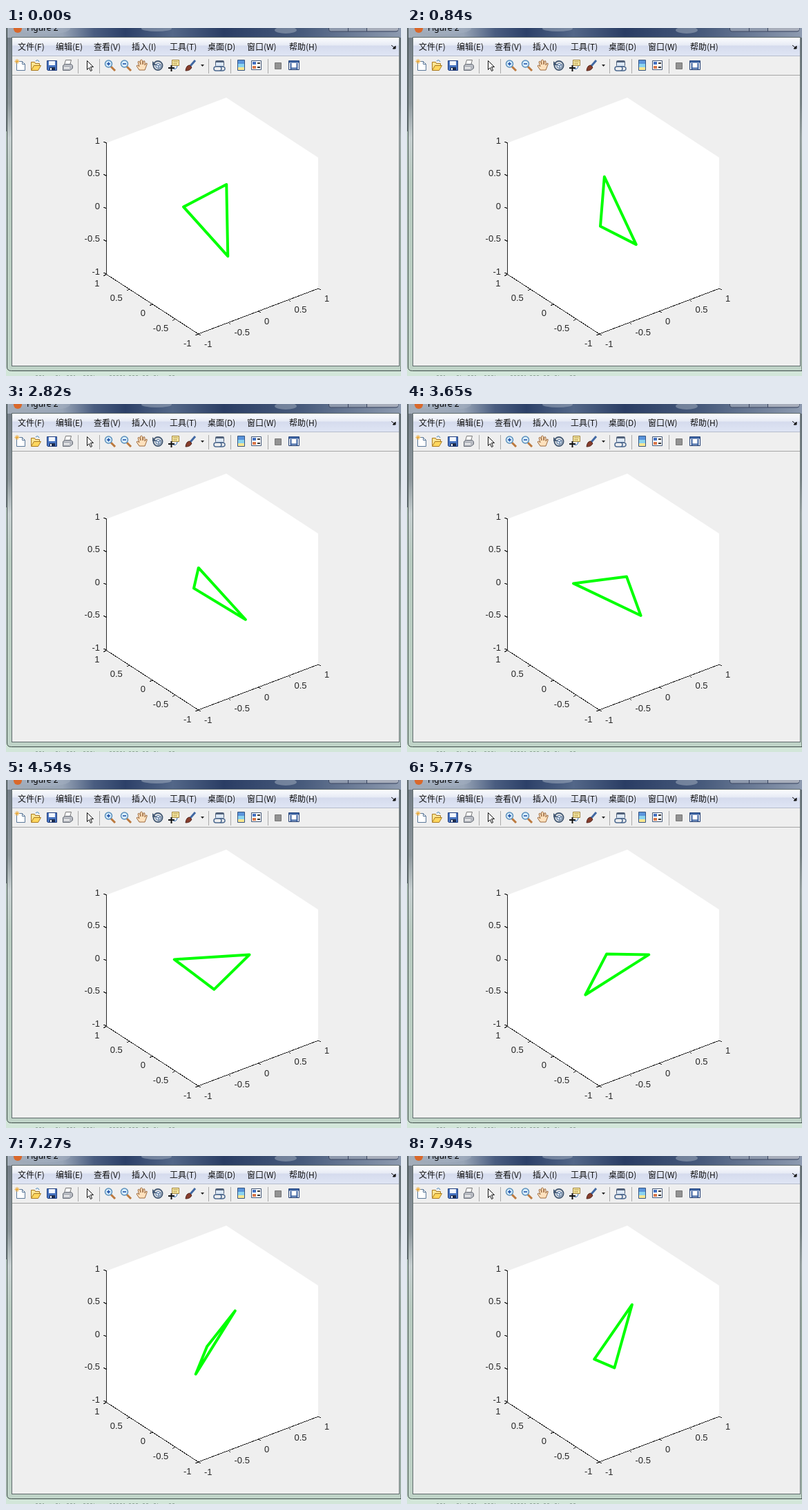
An HTML page that plays this animation: 572x505 px, repeating every 8 s.

```html
<!DOCTYPE html>
<html lang="zh">
<head>
<meta charset="utf-8">
<title>Figure</title>
<style>
html, body { margin: 0; width: 100%; height: 100%; overflow: hidden; background: #d2e6d9; }
svg { display: block; width: 572px; height: 505px; }
.menu { font: 12px "Noto Sans CJK SC", "Noto Sans CJK", sans-serif; fill: #111; }
.labels { font: 13px "Liberation Sans", Arial, sans-serif; fill: #262626; }
</style>
</head>
<body>
<svg viewBox="0 0 572 505">
  <defs>
    <linearGradient id="title">
      <stop offset="0" stop-color="#a3adb9"/><stop offset=".14" stop-color="#97a4b6"/>
      <stop offset=".22" stop-color="#4a5d80"/><stop offset=".3" stop-color="#2c4068"/>
      <stop offset=".42" stop-color="#536788"/><stop offset=".55" stop-color="#2a3d64"/>
      <stop offset=".75" stop-color="#485b7c"/><stop offset="1" stop-color="#8e9bb0"/>
    </linearGradient>
    <linearGradient id="menuBar" x2="0" y2="1">
      <stop offset="0" stop-color="#fbfcfe"/><stop offset=".42" stop-color="#e7ebf5"/>
      <stop offset=".46" stop-color="#d5dbed"/><stop offset="1" stop-color="#dfe5f4"/>
    </linearGradient>
    <linearGradient id="frame" x2="0" y2="1">
      <stop offset="0" stop-color="#707a84"/><stop offset=".22" stop-color="#8d979c"/>
      <stop offset=".32" stop-color="#c6cfd0"/><stop offset=".45" stop-color="#b7cabf"/>
      <stop offset="1" stop-color="#bfd3c7"/>
    </linearGradient>
  </defs>

  <!-- desktop behind and window frame -->
  <rect width="572" height="505" fill="#d2e6d9"/>
  <path d="M0 0h2v150h-2z" fill="#7b858c"/>
  <path d="M43 504.500h12M72 504.500h6M88 504.500h12M112 504.500h16M150 504.500h22M178 504.500h14M198 504.500h10M214 504.500h6M236 504.500h10" stroke="#8fa398" stroke-dasharray="3 2"/>
  <path d="M1.500 0V492q0 5.500 6 5.500H572V0z" fill="url(#frame)" stroke="#3f4c4a"/>
  <rect x="2" width="570" height="14" fill="url(#title)"/>
  <g fill="#a5b1c2" opacity=".5">
    <ellipse cx="55" cy="1" rx="38" ry="8"/><ellipse cx="218" cy="1" rx="22" ry="4"/><ellipse cx="405" cy="3" rx="16" ry="5"/>
  </g>
  <circle cx="17" cy="1" r="6" fill="#d9682b"/>
  <text x="30" y="4" style="font:12px 'Noto Sans',sans-serif">Figure 2</text>
  <path d="M467.500-1v3q0 3 3 3H565q3 0 3-3V-1M495.500 0v5M522.500 0v5" fill="#8f9aad" stroke="#3a4560"/>
  <path d="M523-1h45v3q0 2-3 2h-42z" fill="#a8aebb"/>
  <rect x="8.500" y="13.500" width="561" height="477" fill="#efefef" stroke="#5f6b6c"/>
  <rect x="9" y="14" width="560" height="26" fill="url(#menuBar)"/>
  <path d="M9 40.500h560" stroke="#b6bccc"/>
  <path d="M9 68.500h560" stroke="#a5a5a5"/>
  <path d="M558 25l5 4M564 26v4h-4z" stroke="#111" fill="#111"/>
  <g class="menu" id="menu"></g>

  <!-- toolbar -->
  <path d="M104.500 45v21M135.500 45v21M293.500 45v21M325.500 45v21M379.500 45v21" stroke="#aaa"/>
  <g stroke-linejoin="round">
    <path d="M15.500 48.500h8l4 4v9h-12z" fill="#fff" stroke="#5b7899"/>
    <path d="M23.500 48.500v4h4" fill="none" stroke="#5b7899"/>
    <path d="M16 45v7M12.500 48.500h7M13.500 46l5 5M18.500 46l-5 5" stroke="#eba52c"/>
    <path d="M36.500 60.500v-11h5l1 2h6v3" fill="#ffe592" stroke="#a87920"/>
    <path d="M36.500 61.500l4-7h10l-4 7z" fill="#ffd75e" stroke="#a87920"/>
    <path d="M43 48q3-3 5 1" fill="none" stroke="#377bb6"/>
    <path d="M59.500 47.500h14v14h-13l-1-1z" fill="#4773bf" stroke="#243f7e"/>
    <path d="M62 48h9v6h-9z" fill="#f2f6ff"/><path d="M63 57h8v4h-8z" fill="#1d2c4c"/><path d="M64 58h2v3h-2z" fill="#fff"/>
    <path d="M84.500 53.500l2-7h8l-2 7z" fill="#fff" stroke="#777"/>
    <path d="M82.500 54.500l3-2h9l2 2v4l-4 3h-10z" fill="#b7bac1" stroke="#666c75"/>
    <path d="M84 58h8" stroke="#eee" stroke-width="2"/>
    <path d="M117.500 47.500v13l3-3 2 5 2-1-2-5h4z" fill="#fff" stroke="#111"/>
    <g id="lens">
      <path d="M152 56l6 6" stroke="#bc793d" stroke-width="3"/>
      <circle cx="148.500" cy="52" r="5" fill="#daf0ff" stroke="#5a8fba" stroke-width="1.500"/>
      <path d="M146 52h5" stroke="#174aa1" stroke-width="1.500"/>
    </g>
    <path d="M148.500 49.500v5" stroke="#174aa1" stroke-width="1.500"/>
    <use href="#lens" x="23"/>
    <path d="M193 61l-4-6q1-2 3 0l1 1-2-7q2-2 3 1l1 3-.5-6q2-2 3 0l.5 6 1-5q2-1 2 1v5l2-3q2 0 1 2l-3 8z" fill="#ffe1bd" stroke="#9b693d"/>
    <circle cx="220" cy="54.500" r="6.500" fill="none" stroke="#465b75" stroke-width="2"/>
    <path d="M217 53l3-2 4 2v4l-3 2-4-2zM217 53l4 2v4M221 55l3-2" fill="#dfe9f5" stroke="#476890"/>
    <path d="M212 48v6h6z" fill="#465b75"/>
    <rect x="240.500" y="46.500" width="10" height="8" fill="#fff0aa" stroke="#a0833d"/>
    <path d="M242 49h7M242 52h6" stroke="#a0833d"/>
    <path d="M235 58h9M239.500 54v9" stroke="#111" stroke-width="2"/>
    <path d="M242 59q5 2 6-4" fill="none" stroke="#346db2"/>
    <path d="M267 55l7-8" stroke="#4168a2" stroke-width="3"/>
    <path d="M260 62q1-8 6-8l3 3q-2 5-9 5z" fill="#873d2c" stroke="#54271f"/>
    <path d="M282 53h5l-2.500 3z" fill="#222"/>
    <rect x="303.500" y="47.500" width="12" height="8" rx="1" fill="#dce8f6" stroke="#52627a"/>
    <path d="M304 49h11" stroke="#52627a" stroke-width="2"/>
    <path d="M304 56h5q3 0 3 3t-3 3h-5q-3 0-3-3t3-3M309 56h4q4 0 4 3t-4 3h-4" fill="none" stroke="#4c6990" stroke-width="1.500"/>
    <rect x="335.500" y="46.500" width="10" height="15" fill="#8bd3ee" stroke="#34537f"/>
    <path d="M336 47h9v5h-9z" fill="#5a94db"/><path d="M336 57h9v4h-9z" fill="#ffe790"/>
    <rect x="355.500" y="47.500" width="14" height="13" fill="#fff" stroke="#405575"/>
    <path d="M357 49h5v4h-5z" fill="#426fc1"/><path d="M357 55h5v4h-5z" fill="#dc784b"/>
    <path d="M364 51h4M364 57h4" stroke="#333" stroke-width="2"/>
    <rect x="389.500" y="50.500" width="9" height="9" fill="#929292" stroke="#777"/>
    <rect x="409.500" y="47.500" width="15" height="13" fill="#fff" stroke="#223d70"/>
    <path d="M410 49h14" stroke="#385f9e" stroke-width="3"/>
    <path d="M412.500 51v9M421.500 51v9M413 58.500h8" stroke="#385f9e" stroke-width="2"/>
  </g>

  <!-- axes -->
  <path d="M145 167L319 101L452 188V378L278 444L145 357z" fill="#fff"/>
  <path id="axes" fill="none" stroke="#262626" shape-rendering="crispEdges"/>
  <g class="labels" id="labels"></g>
  <polygon id="triangle" fill="none" stroke="#0f0" stroke-width="4" stroke-linejoin="round"/>
</svg>
<script>
const byId = id => document.getElementById(id);
const textAt = (x, y, s, anchor = "start") => `<text x="${x}" y="${y}" text-anchor="${anchor}">${s}</text>`;

const menuItems = { "文件(F)": 17, "编辑(E)": 72, "查看(V)": 127, "插入(I)": 182, "工具(T)": 237, "桌面(D)": 292, "窗口(W)": 349, "帮助(H)": 410 };
byId("menu").innerHTML = Object.entries(menuItems).map(([s, x]) => textAt(x, 32, s)).join("");

// Each axis runs from its -1 end to its +1 end; labels are right- or left-aligned.
const axes = [
  { from: [145.5, 357], to: [145.5, 167], tick: [-4, -2], first: [136, 358], last: [136, 168], anchor: "end" },
  { from: [278.5, 444], to: [145.5, 357.5], tick: [-4, 2], first: [268.5, 462], last: [135.5, 375], anchor: "end" },
  { from: [278.5, 444], to: [452.5, 378], tick: [3, 2], first: [287, 463], last: [461, 397], anchor: "start" }
];
const mix = (a, b, f) => a.map((v, i) => v + (b[i] - v) * f);
let axisPath = "", labels = "";
for (const a of axes) {
  axisPath += `M${a.from}L${a.to}`;
  ["-1", "-0.5", "0", "0.5", "1"].forEach((s, i) => {
    const [x, y] = mix(a.first, a.last, i / 4);
    axisPath += `M${mix(a.from, a.to, i / 4)}l${a.tick}`;
    labels += textAt(x, Math.floor(y), s, a.anchor);
  });
}
byId("axes").setAttribute("d", axisPath);
byId("labels").innerHTML = labels;

const LOOP = 8000, STEPS = 117, LAG = 18, RADIUS = 62.9, RAD = Math.PI / 180;
// [step, degrees turned]: nearly constant rate
const turns = [[0, 0], [25, 44.3], [41, 74.3], [66, 124.5], [84, 157.2], [96, 179.2], [116, 216]];

function turnAt(step) {
  const i = Math.max(1, turns.findIndex(([s]) => s >= step));
  const [s0, a0] = turns[i - 1], [s1, a1] = turns[i];
  return a0 + (a1 - a0) * (step - s0) / (s1 - s0);
}

// Triangle tilted 60°, spinning in its plane while the plane precesses about z;
// seen orthographically from 30° elevation.
function vertex(turn, offset) {
  const precession = (turn - 31) * RAD, spin = (turn + 21.8 + offset) * RAD;
  const cp = Math.cos(precession), sp = Math.sin(precession);
  const cs = Math.cos(spin), ss = Math.sin(spin);
  const across = -cs * sp - ss * cp / 2;
  const away = cs * cp - ss * sp / 2;
  const up = ss * Math.sin(60 * RAD);
  return [299.2 + RADIUS * across, 272.6 - RADIUS * (away / 2 + up * Math.cos(30 * RAD))];
}

function draw() {
  const time = Math.max(0, performance.now() % LOOP - LAG);
  const turn = turnAt(Math.floor(time / LOOP * STEPS));
  byId("triangle").setAttribute("points", [0, 120, 240].map(o => vertex(turn, o)).join(" "));
  requestAnimationFrame(draw);
}
draw();
</script>
</body>
</html>
```
